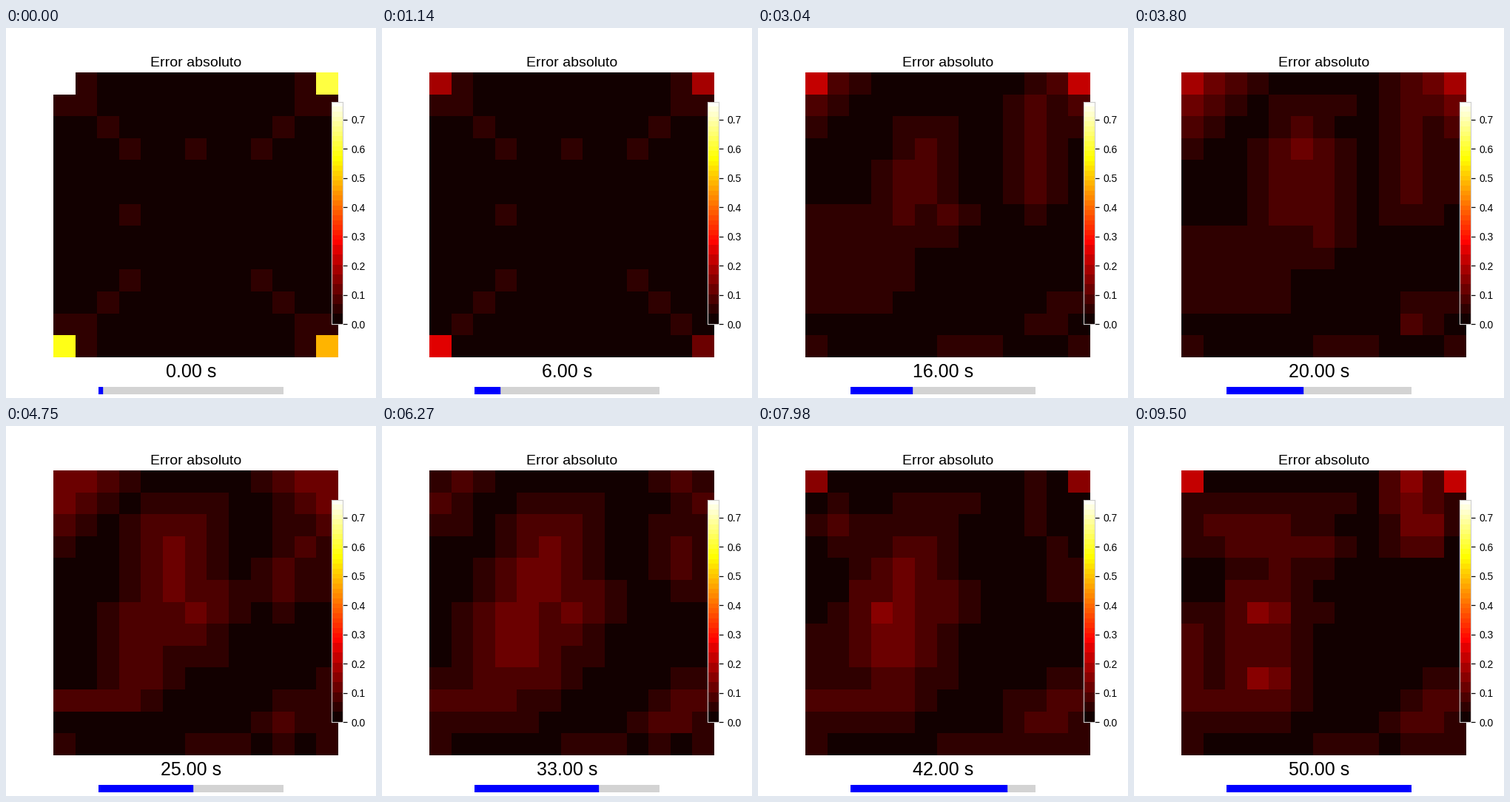
Write a matplotlib script that moves like this. It is 500 px wide and 500 px high and loops after 9.69 s.

```python
import numpy as np
import matplotlib
import matplotlib.pyplot as plt
from matplotlib.animation import FuncAnimation
from matplotlib.patches import Rectangle

N, FRAMES, STEP = 13, 51, 190
LEVELS, VMAX = 22.5, 0.7595

rows, cols = np.mgrid[0:N, 0:N]
dr, dc = abs(rows - N // 2), abs(cols - N // 2)
spread = dr + dc
hot = matplotlib.colormaps["hot"]

# Early faint cells: outer diagonals and two strays
arms = (dr == dc) & (dr >= 3)
arms[3, 6] = arms[6, 3] = True


def swell(t, when, span):
    return np.exp(-((t - when) / span) ** 2)


def ridge(t, start, end, peak, when, span, fall=1):
    """Ridge along a segment that swells around one moment."""
    a, b = np.array(start), np.array(end)
    d = b - a
    u = ((rows - a[0]) * d[0] + (cols - a[1]) * d[1]) / max(d @ d, 1e-9)
    u = np.clip(u, 0, 1)
    dist = np.hypot(rows - a[0] - u * d[0], cols - a[1] - u * d[1])
    onset = 1 - np.exp(-(t / 9) ** 2)
    return peak * onset * swell(t, when, span) - fall * dist


def corners(t):
    """Initial error decays; the top corners keep oscillating."""
    z = np.zeros((N, N))
    wave = (3.5 + 2.5 * np.cos(2 * np.pi * (t - 14) / 36)) * (t > 0)
    z[0, 0] = max(22.5 * np.exp(-t / 4), wave)
    z[0, -1] = max(18 * np.exp(-t / 4.7), wave)
    z[-1, 0] = max(17 * np.exp(-t / 6.5), 1)
    z[-1, -1] = max(14 * np.exp(-t / 4), 1)
    return z


def field(t):
    layers = [
        corners(t),
        1.2 * arms * swell(t, 6, 10),
        (spread == 11) * np.exp(-t / 6),
        # around the top corners
        (rows < 6) * (3.3 * swell(t, 23, 13) - 1.2 * abs(spread - 11)),
        # central ridge, drifting down and left
        ridge(t, (3, 5), (6, 5.6), 3.2, 29, 20),
        ridge(t, (4, 4), (6, 4), 2.7, 35, 28),
        ridge(t, (7, 3.5), (8, 3.5), 3.5, 36, 21),
        ridge(t, (6, 3.2), (6, 3.2), 4.2, 46, 25, 1.6),
        ridge(t, (9, 3.2), (9, 3.2), 4.2, 52, 15, 1.6),
        ridge(t, (2, 1), (3, 5.5), 2.3, 50, 14),
        # left side
        ridge(t, (8, 0), (8, 2), 1.5, 16, 6, 0.4),
        ridge(t, (7, 0), (9, 0), 1.6, 52, 16),
        ridge(t, (10, 0), (10, 3.5), 2.3, 42, 28, 1.2),
        # right side
        ridge(t, (1, 10.2), (5, 10), 2.1, 19, 11),
        ridge(t, (3, 11), (4.5, 11.5), 2.1, 31, 15),
        ridge(t, (0, 10), (2, 10.4), 4, 52, 10, 1.8),
        ridge(t, (11, 10), (10, 11.6), 2.25, 42, 40, 1.2),
        # thin streaks at the bottom and top
        ridge(t, (12, 6), (12, 8), 1.2, 40, 30, 2),
        ridge(t, (1, 4), (1, 7), 1.2, 36, 18, 2),
    ]
    return np.floor(np.clip(np.max(layers, axis=0), 0, None) + 0.5)


def shade(level):
    return hot(np.clip((level + 0.27) / LEVELS, 0, 1))


plt.rcParams["font.family"] = "Liberation Sans"
fig, ax = plt.subplots(figsize=(5, 5), dpi=100)
heat = ax.imshow(shade(field(0)), interpolation="nearest")
ax.set_title("Error absoluto", fontsize=14)
ax.axis("off")

# Stepped colour bar
bar = fig.add_axes([0.88, 0.2, 0.03, 0.6])
v = np.linspace(0, LEVELS, 300, endpoint=False)
v = np.where(v < 8.2, np.floor(v), np.floor(2 * v) / 2)
bar.imshow(shade(v)[:, None], aspect="auto", origin="lower",
           extent=[0, 1, 0, VMAX], interpolation="nearest")
bar.set_xticks([])
bar.set_yticks(np.arange(8) / 10)
bar.yaxis.tick_right()
bar.tick_params(labelsize=10, length=4.5, pad=3.5, width=0.9)
for spine in bar.spines.values():
    spine.set(color="0.8", linewidth=0.8)

clock = fig.text(0.5, 0.056, "", fontsize=18, ha="center", va="baseline")

# Progress bar
track = fig.add_axes([0.25, 0.01, 0.5, 0.02])
track.set(xlim=(0, 1), ylim=(0, 1))
track.axis("off")
track.add_patch(Rectangle((0, 0), 1, 1, color="lightgray", lw=0))
done = track.add_patch(Rectangle((0, 0), 0, 1, color="blue", lw=1))


def update(i):
    heat.set_data(shade(field(i)))
    clock.set_text(f"{i:.2f} s")
    done.set_width((i + 1) / FRAMES)
    return heat, clock, done


anim = FuncAnimation(fig, update, frames=FRAMES, interval=STEP, repeat=True)
plt.show()
```
